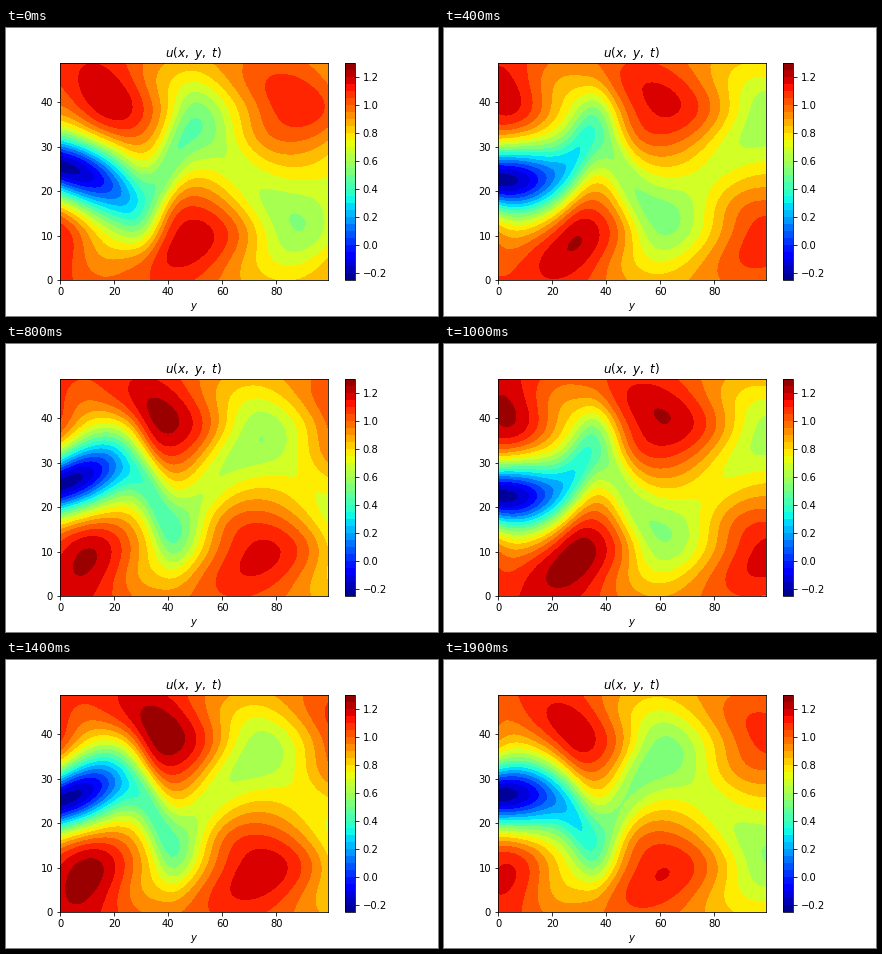
Write a matplotlib script that moves like this. It is 432 px wide and 288 px high and loops after 2 s.

```python
import numpy as np
import matplotlib.pyplot as plt
from matplotlib.animation import FuncAnimation
from matplotlib.cm import ScalarMappable
from matplotlib.colors import BoundaryNorm, ListedColormap

FRAMES, INTERVAL = 20, 100
PERIOD = 6        # frames per shedding cycle
BANDS = 19        # filled contour bands
MID = 24.5        # wake axis

X, Y = np.meshgrid(np.arange(100.0), np.arange(50.0))
ETA = Y - MID


def bump(v, centre, width):
    return np.exp(-((v - centre) / width) ** 2)


# Frame at which a crest passes each point, for the outer flow and the wake.
LAG = (X - 48) / 13 - 1.4 * np.exp(-X / 18)
LAG_WAKE = LAG - 1.35 * bump(X, 26, 18)
LAG_OUTER = LAG - 0.7 * (bump(np.abs(ETA), 13, 8) - 0.78)

BASE = 14 + 2.5 * np.exp(-(X / 50) ** 1.5)
DEFICIT = 1.6 + 14.4 / (1 + (X / 28) ** 2.4)
WIDTH = 7.8 + 2.4 * (1 - np.exp(-X / 30))
SWAY = 7 * (1 - 0.75 * bump(X, 0, 22))
SWING = 2.7 - 1.7 * np.exp(-X / 18) + 0.4 * bump(X, 38, 20)
ODD = bump(ETA, -15.5, 10) - bump(ETA, 15.5, 10)

# Slow drift of the overall level
DRIFT_AT = [0, 4, 7, 10, 14, 16, 19]
DRIFT = [-0.1, 0.0, 0.15, 0.7, 0.7, 0.0, -0.3]


def wave(i, lag):
    return np.cos(2 * np.pi * (i - lag) / PERIOD)


def velocity(i):
    """Flow speed in units of contour bands."""
    wake = DEFICIT * bump(ETA, SWAY * wave(i, LAG_WAKE), WIDTH)
    u = BASE - wake + SWING * ODD * wave(i, LAG_OUTER)
    u = u * (1 + np.interp(i, DRIFT_AT, DRIFT) / 17)
    return np.clip(u, 0.05, BANDS - 0.05)


fig, ax = plt.subplots(figsize=(6, 4), dpi=72, facecolor="white")
fig.subplots_adjust(left=0.125, right=0.9, bottom=0.125, top=0.88)

steps = np.linspace(-0.25, 1.3, 32)
n = len(steps) - 1
jet = plt.get_cmap("jet")
scale = ScalarMappable(BoundaryNorm(steps, n),
                       ListedColormap(jet((np.arange(n) + 0.5) / n)))
bar = fig.colorbar(scale, ax=ax, ticks=np.linspace(-0.2, 1.2, 8).round(1))
bar.minorticks_off()

ax.set_title(r"$u(x,\ y,\ t)$")
ax.set_xlabel("$y$")
ax.set_xlim(0, 99)
ax.set_ylim(0, 49)

layers = []


def draw(i):
    while layers:
        layers.pop().remove()
    layers.append(ax.contourf(X, Y, velocity(i), levels=np.arange(BANDS + 1),
                              cmap="jet"))
    return layers


anim = FuncAnimation(fig, draw, frames=FRAMES, interval=INTERVAL,
                     init_func=lambda: draw(0), repeat=True, repeat_delay=0,
                     blit=False)
plt.show()
```
